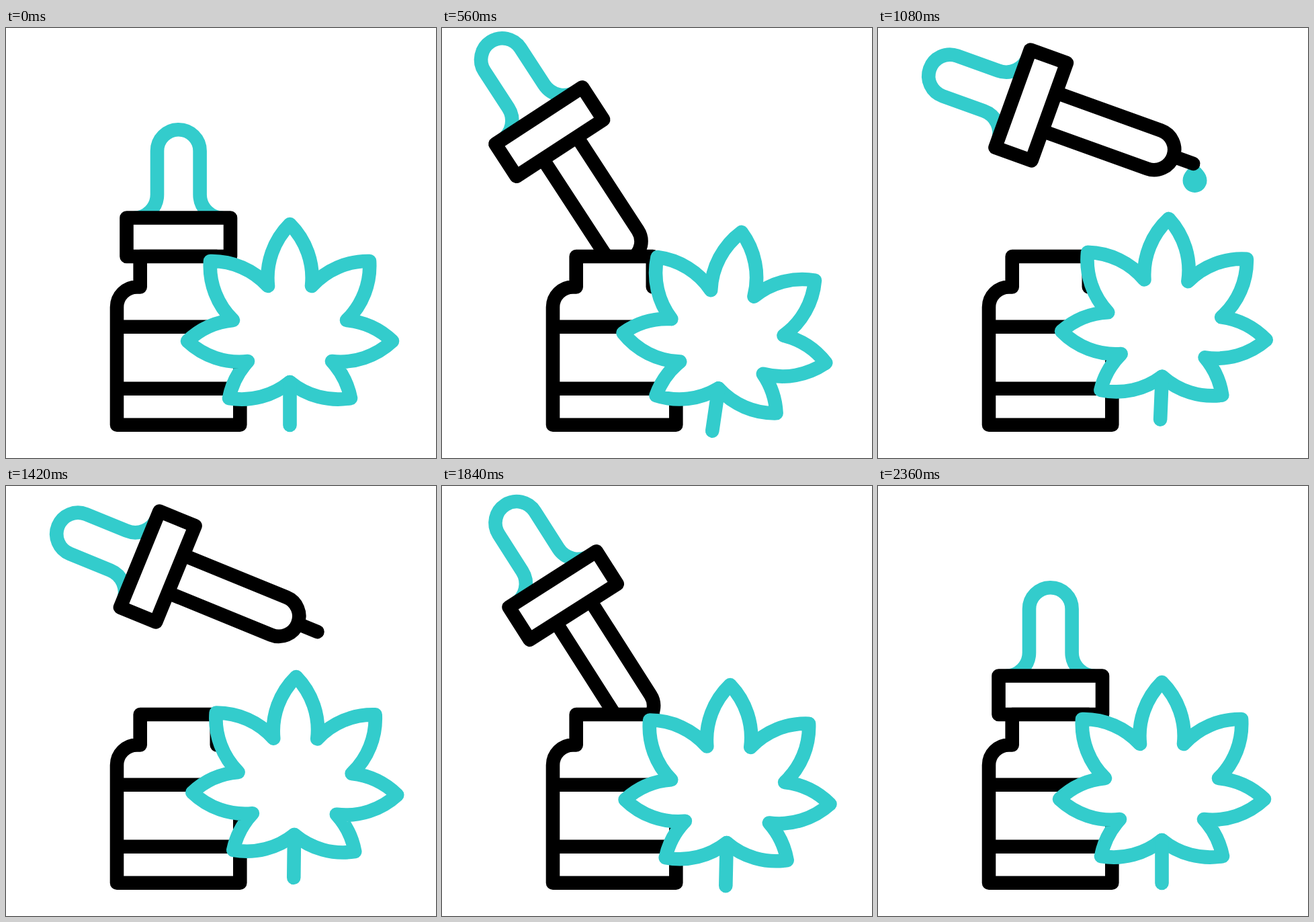
Write an HTML page that moves like this. It is 640 px wide and 640 px high and loops after 2400 ms.

```html
<!DOCTYPE html>
<html lang="en">
<head>
<meta charset="utf-8">
<title>Dropper and leaf</title>
<style>
  html, body { margin: 0; width: 100%; height: 100%; overflow: hidden; background: #fff; }
  svg { display: block; width: 100vw; height: 100vh; }
  .line { fill: #fff; stroke: #000; stroke-width: 20.6; stroke-linecap: round; stroke-linejoin: round; }
  .teal { stroke: #33cccc; }
</style>
</head>
<body>
<svg viewBox="0 0 640 640">
  <path id="drop" fill="#33cccc" d="M0-28C8-18 18-12 18 0A18 18 0 0 1-18 0C-18-12-8-18 0-28Z"/>
  <g id="dropper" class="line">
    <path class="teal" stroke-linecap="butt" d="M190 283A35 35 0 0 0 225 248V183A31.8 31.8 0 0 1 288.6 183V248A35 35 0 0 0 323.6 283"/>
    <path d="M256.75 537V568"/>
    <path d="M226.5 339V506A30.25 30.25 0 0 0 287 506V339"/>
    <path d="M179.5 282.5H334V340H179.5Z"/>
  </g>
  <g class="line">
    <path d="M199.7 340V385.5H195A30 30 0 0 0 165 415.5V590.7H348.3V415.5A30 30 0 0 0 318.3 385.5H313.8V340Z"/>
    <path stroke-linecap="butt" d="M165 444.7H348M165 536.7H348"/>
  </g>
  <g id="leaf" class="line teal">
    <path id="blade"/>
    <path d="M422.5 527V591"/>
  </g>
</svg>
<script>
  const LOOP = 2400;
  const BULB = { x: 256.75, y: 183 };
  const LEAF = { x: 422.5, y: 466 };
  const $ = id => document.getElementById(id);

  // Tips and valleys of the right half, mirrored and joined by equal arcs.
  const half = [[0, 292], [32.5, 384], [118.5, 347], [84.5, 435],
    [152.5, 466], [62.5, 496], [90.5, 551], [0, 527]];
  const corners = [...half, ...half.slice(0, -1).reverse().map(([x, y]) => [-x, y])];
  $('blade').setAttribute('d', corners
    .map(([x, y], i) => `${i ? 'A113 113 0 0 1 ' : 'M'}${LEAF.x + x} ${y}`).join('') + 'Z');

  const span = (t, a, b) => Math.min(1, Math.max(0, (t - a) / (b - a)));
  const ease = (t, a, b) => {
    const p = span(t, a, b);
    return p * p * (3 - 2 * p);
  };

  // Each move: start, end, then the change in x, y and angle.
  const dropperMoves = [
    [80, 1080, 0, 0, -70.2],
    [160, 600, -170.75, -139, 0],
    [560, 900, 21, 27.5, 0],
    [1308, 2324, 0, 0, 70.2],
    [1490, 1860, -8, -27.5, 0],
    [1750, 2285, 157.75, 139, 0]
  ];
  const leafMoves = [
    [235, 690, -2.6, 12.5, 10.4],
    [690, 1240, 0, -26, -10],
    [860, 1290, 10.6, 0, 0],
    [1240, 1730, 0, 17.8, 0.9],
    [1240, 2200, -8, 0, 0],
    [1780, 2260, 0, -4.3, -1.3]
  ];

  const pose = (moves, t) => moves.reduce(([x, y, turn], [a, b, dx, dy, dTurn]) => {
    const k = ease(t, a, b);
    return [x + k * dx, y + k * dy, turn + k * dTurn];
  }, [0, 0, 0]);

  const place = (id, [x, y, turn], pivot) => $(id).setAttribute('transform',
    `translate(${x} ${y}) rotate(${turn} ${pivot.x} ${pivot.y})`);

  function draw(now) {
    const t = now % LOOP;
    const dropper = pose(dropperMoves, t);
    place('dropper', dropper, BULB);
    place('leaf', pose(leafMoves, t), LEAF);

    // The drop swells at the nozzle, then falls behind the leaf.
    const [x, y, turn] = dropper, r = turn * Math.PI / 180;
    const tipX = BULB.x + x - 385 * Math.sin(r);
    const tipY = BULB.y + y + 385 * Math.cos(r);
    const size = t < 1300 ? ease(t, 940, 1070) : 0;
    const fall = 195 * span(t, 1090, 1300) ** 2;
    $('drop').setAttribute('transform',
      `translate(${tipX + 2.3} ${tipY + 25 * size + fall}) scale(${size})`);
    requestAnimationFrame(draw);
  }
  draw(0);
</script>
</body>
</html>
```
